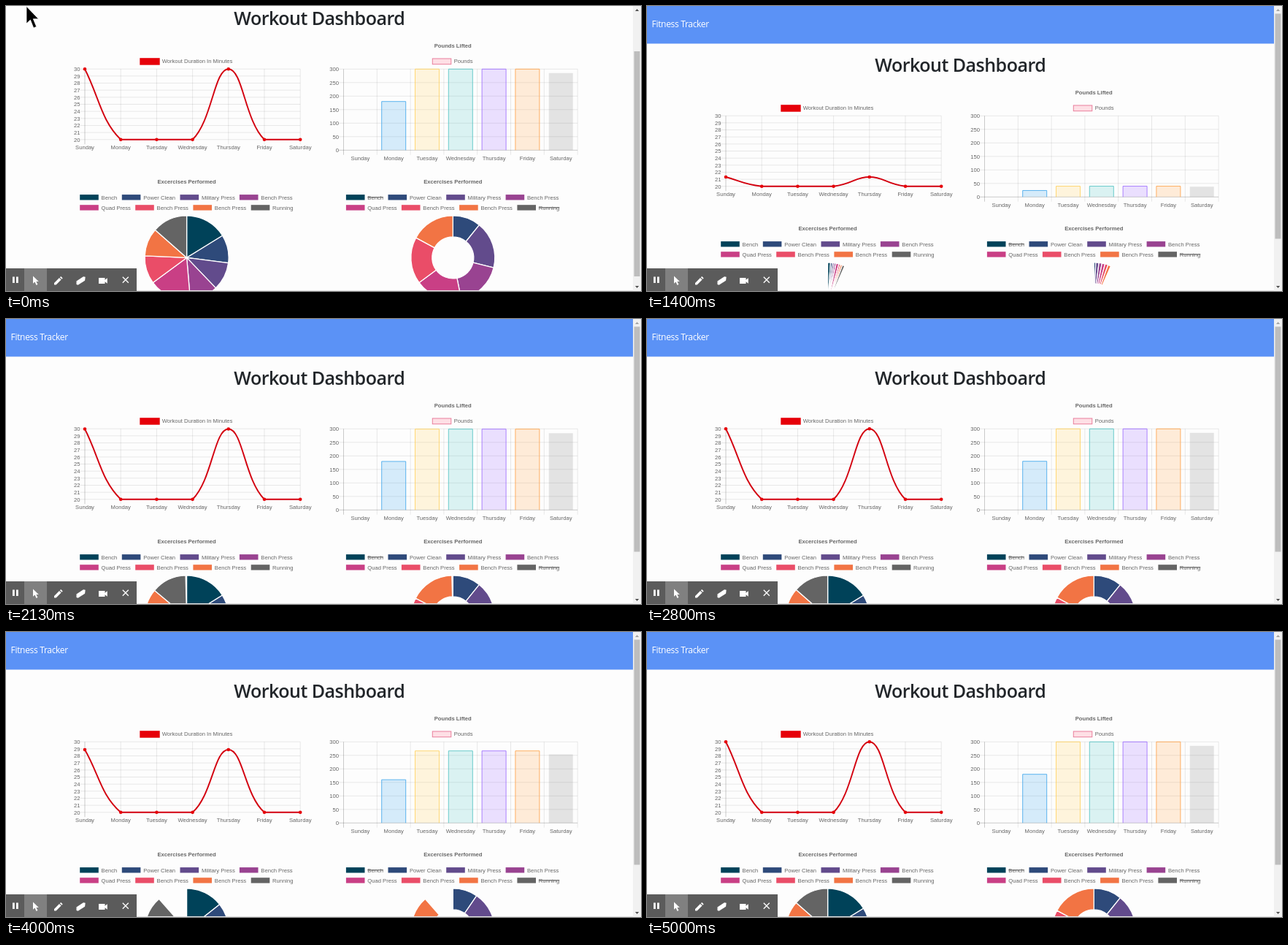
An HTML page for the animation above (5130 ms loop, 870 px wide and 390 px high).

```html
<!DOCTYPE html>
<html lang="en">
<head>
<meta charset="utf-8">
<title>Workout Dashboard</title>
<style>
  html, body { margin: 0; width: 100%; height: 100%; overflow: hidden; background: #fdfdfd; }
  svg { display: block; width: 870px; height: 390px; }
  text { font: 7.65px "Liberation Sans", Arial, sans-serif; fill: #666; }
  .bold { font-weight: bold; }
  .mid { text-anchor: middle; }
  .end { text-anchor: end; }
  .heading { font: 600 25px "Open Sans", "Noto Sans", sans-serif; letter-spacing: -.02em; fill: #212529; text-anchor: middle; }
  .brand { font: 400 12px "Open Sans", "Noto Sans", sans-serif; letter-spacing: -.025em; fill: #fff; }
  .grid { stroke: #000; stroke-opacity: .11; stroke-width: .8; fill: none; }
  .axis { stroke: #000; stroke-opacity: .25; stroke-width: .8; fill: none; }
  .slice { stroke: #fff; stroke-width: 1.3; stroke-linejoin: bevel; }
</style>
</head>
<body>
<svg id="stage" viewBox="0 0 870 390">
  <g id="page">
    <rect id="nav" width="870" height="51.5" fill="#5b92f6"/>
    <text class="brand" x="6.5" y="29.4">Fitness Tracker</text>
    <text id="heading" class="heading" x="429.5" y="89.5">Workout Dashboard</text>
    <g id="charts"></g>
  </g>
  <path d="M179 389.5H869.5V52" fill="none" stroke="#e6e6e6"/>
  <g id="scrollbar">
    <rect x="859" width="11" height="390" fill="#f1f1f1"/>
    <rect id="thumb" x="860.5" y="10.5" width="8" height="308" fill="#bdbdbd"/>
    <path id="up" d="M862 7l2.6-3 2.6 3z"/>
    <path d="M862 383l2.6 3 2.6-3z" fill="#505050"/>
  </g>
  <g id="toolbar" fill="#fff">
    <rect y="359" width="179" height="31" fill="#5b5b5b"/>
    <rect x="25" y="359" width="31" height="31" fill="#808080"/>
    <path d="M9 370.5h2.8v8.5H9zM14 370.5h2.8v8.5H14z"/>
    <path d="M37 369.5v10.2l2.5-2.1 2 4.4 1.9-.9-2-4.2h3.4z"/>
    <path d="M66 381.5v-2.6l7-7 2.6 2.6-7 7zM73.8 371.2l1.4-1.3 2.5 2.5-1.3 1.4z"/>
    <path d="M96.5 376.5l9.5-6.3 2.7.5-.6 5-9.5 6-2.1-.7z"/>
    <path d="M127 372h8.5v2.8l3.3-2.6v7.6l-3.3-2.6v2.8H127z"/>
    <path d="M159.8 370.8l8 8m0-8l-8 8" fill="none" stroke="#fff" stroke-width="1.3"/>
  </g>
  <path id="cursor" d="M0 0V23.5L5.4 18.5 9.8 29.5 13.7 27.8 9.3 17.2H16.5Z" stroke="#fff" stroke-width=".7"/>
</svg>
<script>
const LOOP = 5130;
const SCROLL = 64;
// Reloads: page goes blank, then the charts animate; round charts lag slightly.
const RELOADS = [
  { blank: 1255, start: 1366, lag: 18 },
  { blank: 3455, start: 3579, lag: 4 }
];
const DAYS = ['Sunday', 'Monday', 'Tuesday', 'Wednesday', 'Thursday', 'Friday', 'Saturday'];
const MINUTES = [30, 20, 20, 20, 30, 20, 20, 25];
const POUNDS = [0, 180, 300, 300, 300, 300, 285];
const EXERCISES = ['Bench', 'Power Clean', 'Military Press', 'Bench Press',
  'Quad Press', 'Bench Press', 'Bench Press', 'Running'];
const PALETTE = ['#004259', '#2e4a7a', '#624b8c', '#994391', '#c93f85', '#ea4d68', '#f27444', '#646464'];
const BAR_RGB = ['255,99,132', '54,162,235', '255,206,86', '75,192,192', '153,102,255', '255,159,64'];
const RED = '#e60009';
const LINE_RED = '#d3000f';

const $ = id => document.getElementById(id);
const charts = $('charts');

function add(tag, attrs, text) {
  const node = document.createElementNS('http://www.w3.org/2000/svg', tag);
  for (const key in attrs) node.setAttribute(key, attrs[key]);
  if (text !== undefined) node.textContent = text;
  charts.appendChild(node);
  return node;
}
const label = (x, y, text, cls = '') => add('text', { x, y: y + 2.7, class: cls }, text);
const line = (d, cls = 'grid') => add('path', { d, class: cls });
const clamp = (v, lo, hi) => Math.min(hi, Math.max(lo, v));

function makeLine() {
  const left = 108, step = 49.2, top = 150.2, base = 246.8, right = left + 6 * step;
  add('rect', { x: 183.3, y: 135.2, width: 27.4, height: 9.5, fill: RED });
  label(213.7, 139.6, 'Workout Duration In Minutes');
  for (let v = 20; v <= 30; v++) {
    const y = base - (v - 20) * (base - top) / 10;
    line(`M${left - 6.4} ${y}H${right}`);
    label(101.6, y, v, 'end');
  }
  DAYS.forEach((day, i) => {
    const x = left + i * step;
    line(`M${x} ${top}V${base + 6.4}`, i ? 'grid' : 'axis');
    label(x, 257.4, day, 'mid');
  });

  const pts = DAYS.map((_, i) => [left + i * step, base - (MINUTES[i] - 20) * (base - top) / 10]);
  const dist = (a, b) => Math.hypot(a[0] - b[0], a[1] - b[1]);
  const handles = pts.map((p, i) => {
    const a = pts[i - 1] || p, b = pts[i + 1] || p;
    const before = dist(a, p), after = dist(p, b);
    const at = k => [
      clamp(p[0] + k * (b[0] - a[0]), left, right),
      clamp(p[1] + k * (b[1] - a[1]), top, base)
    ];
    return { into: at(-.4 * before / (before + after)), out: at(.4 * after / (before + after)) };
  });
  const curve = add('path', { fill: 'none', stroke: LINE_RED, 'stroke-width': 1.9, 'stroke-linejoin': 'round' });
  const dots = pts.map(p => add('circle', { cx: p[0], r: 2.3, fill: RED }));

  return k => {
    const y = v => base + (v - base) * k;
    const pair = p => `${p[0]} ${y(p[1])}`;
    let d = 'M' + pair(pts[0]);
    for (let i = 1; i < pts.length; i++)
      d += `C${pair(handles[i - 1].out)} ${pair(handles[i].into)} ${pair(pts[i])}`;
    curve.setAttribute('d', d);
    dots.forEach((dot, i) => dot.setAttribute('cy', y(pts[i][1])));
  };
}

function makeBars() {
  const left = 462.5, step = 45.8, top = 150.3, base = 261.3, right = left + 7 * step, half = 16.5;
  label(612.2, 118.6, 'Pounds Lifted', 'bold mid');
  add('rect', { x: 584.3, y: 136, width: 25.5, height: 7.7, stroke: '#ea7f9d',
    fill: 'rgba(255,99,132,.2)', 'stroke-width': 1 });
  label(613.7, 139.6, 'Pounds');
  for (let v = 0; v <= 300; v += 50) {
    const y = base - v * (base - top) / 300;
    line(`M${left - 6.4} ${y}H${right}`, v ? 'grid' : 'axis');
    label(456, y, v, 'end');
  }
  for (let i = 0; i <= 7; i++)
    line(`M${left + i * step} ${top}V${base + 6.4}`, i ? 'grid' : 'axis');

  const bars = DAYS.map((day, i) => {
    const x = left + (i + .5) * step, rgb = BAR_RGB[i];
    label(x, 272, day, 'mid');
    const bar = add('path', {
      fill: rgb ? `rgba(${rgb},.2)` : 'rgba(0,0,0,.1)',
      stroke: rgb ? `rgb(${rgb})` : 'none', 'stroke-width': .8
    });
    return { bar, x, h: POUNDS[i] * (base - top) / 300 };
  });
  return k => bars.forEach(({ bar, x, h }) =>
    bar.setAttribute('d', h ? `M${x - half} ${base}V${base - h * k}H${x + half}V${base}` : ''));
}

function makeRound(cx, data, inner) {
  const cy = 408.4, outer = 57.5, shift = cx - 247.6;
  const boxes = [101.2, 158.8, 238.5, 319.9, 101.2, 177.2, 256.4, 335.7];
  label(cx, 304.6, 'Excercises Performed', 'bold mid');
  EXERCISES.forEach((name, i) => {
    const x = boxes[i] + shift, y = i < 4 ? 325.8 : 339.9;
    add('rect', { x, y: y - 3.7, width: 25.6, height: 7.4, fill: PALETTE[i] });
    const text = label(x + 29.4, y, name);
    if (!data[i])
      add('path', { d: `M${x + 29.4} ${y}h${text.getComputedTextLength()}`, stroke: '#666', 'stroke-width': 1.1 });
  });

  const total = data.reduce((a, b) => a + b);
  let sum = 0;
  const slices = data.map((v, i) => {
    const from = sum / total, to = (sum += v) / total;
    return { from, to, node: add('path', { class: 'slice', fill: PALETTE[i] }) };
  }).filter(s => s.to > s.from);
  const at = (turn, r) => {
    const a = turn * 2 * Math.PI;
    return `${cx + r * Math.sin(a)} ${cy - r * Math.cos(a)}`;
  };
  return k => slices.forEach(({ from, to, node }) => {
    const a = from * k, b = to * k;
    const back = inner ? `L${at(b, inner)}A${inner} ${inner} 0 0 0 ${at(a, inner)}` : `L${cx} ${cy}`;
    node.setAttribute('d', `M${at(a, outer)}A${outer} ${outer} 0 0 1 ${at(b, outer)}${back}Z`);
  });
}

const straight = [makeLine(), makeBars()];
const round = [makeRound(247.6, MINUTES, 0), makeRound(612.3, [0, ...POUNDS.slice(1), 0], 28.5)];

const easeOutQuart = p => 1 - (1 - clamp(p, 0, 1)) ** 4;
const show = (id, on) => $(id).setAttribute('visibility', on ? 'visible' : 'hidden');

function render(t) {
  const load = RELOADS.filter(r => t >= r.blank).pop();
  const blank = load && t < load.start;
  const scroll = load ? 0 : SCROLL;

  $('page').setAttribute('transform', `translate(0 ${-scroll})`);
  $('heading').setAttribute('x', blank ? 434.8 : 429.3);
  $('thumb').setAttribute('y', load ? 10.5 : 62);
  $('up').setAttribute('fill', load ? '#a3a3a3' : '#505050');
  show('charts', !blank);
  show('scrollbar', !blank);
  show('cursor', !load);

  const grow = lag => load ? easeOutQuart((t - load.start - lag) / 1000) : 1;
  straight.forEach(draw => draw(grow(0)));
  round.forEach(draw => draw(grow(load ? load.lag : 0)));

  const shrink = clamp((t - 50) / 500, 0, 1);
  $('cursor').setAttribute('transform',
    `translate(${28 - shrink} ${.5 + shrink}) scale(${1 - .7 * shrink})`);
}

function tick() {
  render(performance.now() % LOOP);
  requestAnimationFrame(tick);
}
tick();
</script>
</body>
</html>
```
